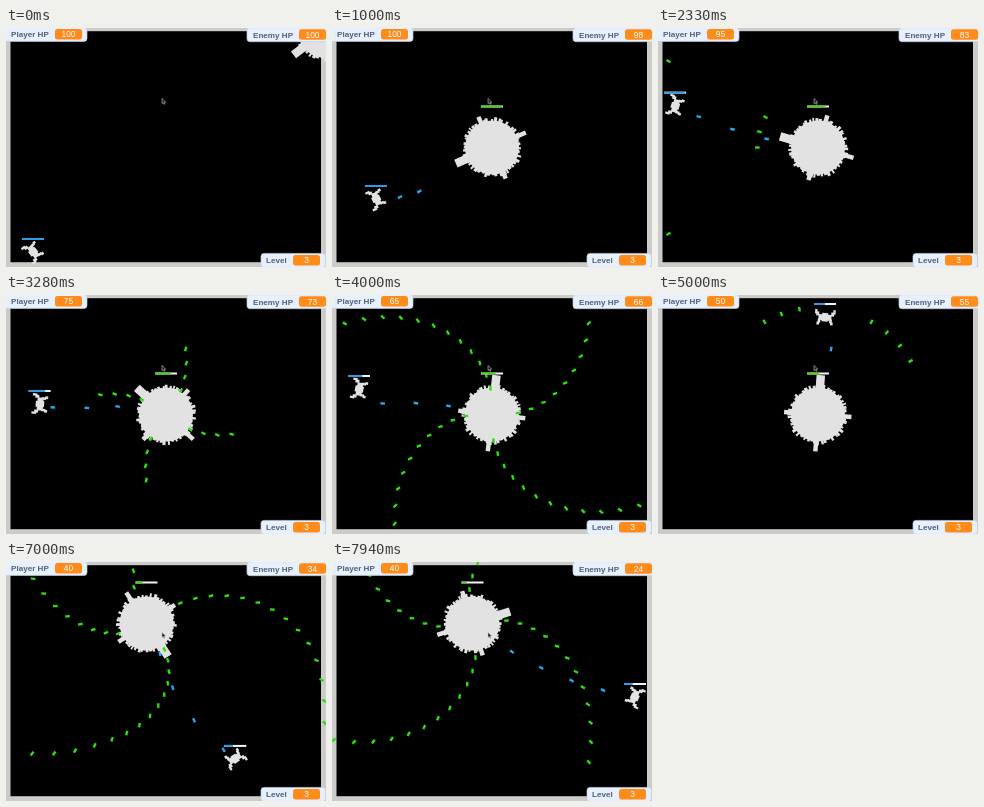
An HTML page with a canvas that plays this animation: 320x239 px, repeating every 8 s.

```html
<!DOCTYPE html>
<html lang="en">
<head>
<meta charset="utf-8">
<title>Boss fight</title>
<style>
  html, body { margin: 0; width: 100%; height: 100%; overflow: hidden; background: #000; }
  canvas { display: block; width: 100%; height: 100%; }
</style>
</head>
<body>
<canvas id="stage"></canvas>
<script>
const W = 320, H = 239, LOOP = 8000, FPS = 18, RAD = Math.PI / 180;
const ENEMY_R = 27, HIT_R = 20, MUZZLE_MS = 125;
const FIRST_SHOT = 793, SHOT_GAP = 98;
const BLUE = '#1fa9f5', GREEN = '#2be00d', PALE = '#e2e2e2';

const canvas = document.getElementById('stage');
const ctx = canvas.getContext('2d');
const ratio = Math.max(1, window.devicePixelRatio || 1);
canvas.width = W * ratio;
canvas.height = H * ratio;

// Key points: [time, x, y].
const playerPath = [
  [0, 27, 224], [750, 22, 208], [1000, 44, 171], [1400, 16, 140], [2330, 17, 78],
  [2600, 20, 50], [3200, 36, 115], [3600, 24, 84], [3930, 26, 106], [4000, 27, 94],
  [4500, 110, 26], [4890, 182, 23], [5000, 167, 22], [5500, 60, 65], [5800, 28, 118],
  [6110, 84, 158], [6650, 170, 205], [7300, 280, 190], [7700, 297, 157], [7940, 303, 135]
];
const enemyPath = [
  [0, 319, 3], [850, 160, 119.5], [5020, 160, 119.5], [5940, 157, 30], [6200, 157, 30], [6950, 140.5, 61.5]
];
const playerHpPath = [[0, 100], [2000, 100], [3900, 65], [5000, 50], [7200, 40]];

const playerHp = t => 5 * Math.round(along(playerHpPath, t)[0] / 5);
const enemyHp = t => Math.min(100, Math.round(97.6 - (t - 1000) * 0.01066));

const spirals = [
  { start: 2935, count: 17, angle: 196.7, turn: 5 },
  { start: 5960, count: 14, angle: 129, turn: -5 },
  { start: 7040, count: 16, angle: 50, turn: -5 }
];
const SPIRAL_STEP = 66.7;
const fans = [
  { start: 1470, first: 150, gap: 10, count: 10 },
  { start: 2030, first: 180, gap: 15, count: 3 },
  { start: 4465, first: 240, gap: 10, count: 10 }
];

function along(path, t) {
  const i = path.findIndex(row => row[0] > t);
  if (i < 0) return path[path.length - 1].slice(1);
  const a = path[i - 1], b = path[i], k = (t - a[0]) / (b[0] - a[0]);
  return a.slice(1).map((v, n) => v + (b[n + 1] - v) * k);
}
const playerAt = t => along(playerPath, t);
const enemyAt = t => along(enemyPath, t);
const distance = (a, b) => Math.hypot(a[0] - b[0], a[1] - b[1]);
const aim = (a, b) => Math.atan2(b[1] - a[1], b[0] - a[0]);

function gunAngle(t) {
  const s = spirals.find(s => t >= s.start && t < s.start + s.count * SPIRAL_STEP);
  return s ? (s.angle + s.turn * (t - s.start) / SPIRAL_STEP) * RAD : aim(enemyAt(t), playerAt(t));
}

function bulletAt(b, t) {
  const d = (t - b.start) * b.speed;
  return [b.from[0] + Math.cos(b.angle) * d, b.from[1] + Math.sin(b.angle) * d];
}

// A bullet lives until it first comes within reach of its target.
function shoot(b, target, radius) {
  b.end = b.start + 2200;
  for (let t = b.start; t < b.end; t += 10) {
    if (distance(bulletAt(b, t), target(t)) < radius) b.end = t;
  }
  return b;
}
const enemyShot = (start, degrees) =>
  shoot({ start, from: enemyAt(start), angle: degrees * RAD, speed: 0.2 }, playerAt, HIT_R);
function playerShot(start) {
  const from = playerAt(start);
  return shoot({ start, from, angle: aim(from, enemyAt(start)), speed: 0.35 }, enemyAt, ENEMY_R);
}

const enemyShots = [], playerShots = [];
for (const s of spirals)
  for (let i = 0; i < s.count; i++)
    for (let arm = 0; arm < 4; arm++)
      enemyShots.push(enemyShot(s.start + i * SPIRAL_STEP, s.angle + i * s.turn + arm * 90));
for (const f of fans)
  for (let i = 0; i < f.count; i++) enemyShots.push(enemyShot(f.start, f.first + i * f.gap));
for (let t = FIRST_SHOT; t < LOOP; t += SHOT_GAP) playerShots.push(playerShot(t));

let seed = 11;
const random = () => (seed = seed * 16807 % 2147483647) / 2147483647;
const teeth = Array.from({ length: 46 }, (_, i) => ({
  angle: (i + random() * 0.6) / 46 * Math.PI * 2,
  reach: ENEMY_R + 0.5 + random() * 3.2,
  width: 1.8 + random() * 1.6
}));

function rect(x, y, w, h, color) {
  ctx.fillStyle = color;
  ctx.fillRect(x, y, w, h);
}

function placed([x, y], angle, draw) {
  ctx.save();
  ctx.translate(x, y);
  ctx.rotate(angle);
  draw();
  ctx.restore();
}

function drawShots(shots, t, delay, color) {
  for (const b of shots) {
    if (t < b.start + delay || t >= b.end) continue;
    placed(bulletAt(b, t), b.angle, () => rect(-2.3, -1.2, 4.6, 2.4, color));
  }
}

function spike(angle, reach, width) {
  placed([0, 0], angle, () => rect(20, -width / 2, reach - 20, width, PALE));
}

function drawEnemy(pos, angle) {
  placed(pos, angle, () => {
    ctx.fillStyle = PALE;
    ctx.beginPath();
    ctx.arc(0, 0, ENEMY_R, 0, Math.PI * 2);
    ctx.fill();
    teeth.forEach(s => spike(s.angle, s.reach, s.width));
    spike(0, 39.5, 8.5);
    spike(Math.PI / 2, 33.5, 4.5);
    spike(Math.PI, 37, 4.5);
    spike(-Math.PI / 2, 34, 4.5);
  });
}

function drawPlayer(pos, angle) {
  placed(pos, angle, () => {
    rect(-2.5, -6.5, 6, 13, PALE);
    rect(-4, -3, 8.5, 6, PALE);
    for (const side of [-1, 1]) {
      ctx.save();
      ctx.scale(1, side);
      rect(-5, 6, 4, 3, PALE);
      rect(-7.5, 8, 4.5, 2.3, PALE);
      rect(2, 4.5, 4, 2.6, PALE);
      rect(5, 5.5, 3, 2.6, PALE);
      ctx.restore();
    }
  });
}

function drawBar([x, y], part, color) {
  rect(x - 11, y - 1, 22, 2, '#f4f4f4');
  rect(x - 11, y - 1, 22 * part, 2, color);
}

function box(x, y, w, h, r, fill, stroke) {
  ctx.beginPath();
  ctx.roundRect(x, y, w, h, r);
  ctx.fillStyle = fill;
  ctx.fill();
  if (!stroke) return;
  ctx.strokeStyle = stroke;
  ctx.lineWidth = 0.7;
  ctx.stroke();
}

function monitor(x, y, w, label, labelX, valueX, value) {
  box(x, y, w, 14, 3, '#e6f0ff', '#c4ccd8');
  box(valueX, y + 1.6, 27, 10.4, 2.5, '#ff8c1a');
  ctx.textBaseline = 'alphabetic';
  ctx.textAlign = 'left';
  ctx.font = 'bold 8.1px "Liberation Sans", Arial, sans-serif';
  ctx.fillStyle = '#575e75';
  ctx.fillText(label, labelX, y + 9.8);
  ctx.textAlign = 'center';
  ctx.font = '8.4px "Liberation Sans", Arial, sans-serif';
  ctx.fillStyle = '#fff';
  ctx.fillText(value, valueX + 13.5, y + 9.8);
}

function drawCursor(x, y) {
  ctx.beginPath();
  [[0, 0], [0, 5], [1.2, 4], [2.1, 5.8], [3, 5.4], [2.2, 3.6], [3.7, 3.6]]
    .forEach(([dx, dy]) => ctx.lineTo(x + dx, y + dy));
  ctx.closePath();
  ctx.fillStyle = '#111';
  ctx.fill();
  ctx.strokeStyle = '#c8c8c8';
  ctx.lineWidth = 0.6;
  ctx.stroke();
}

function draw(t) {
  const player = playerAt(t), enemy = enemyAt(t);

  ctx.setTransform(ratio, 0, 0, ratio, 0, 0);
  rect(0, 0, W, H, '#cbccca');
  rect(4.5, 3.2, 310.5, 231, '#000');

  drawShots(playerShots, t, 0, BLUE);
  drawPlayer(player, aim(player, enemy));
  drawEnemy(enemy, gunAngle(t));
  drawShots(enemyShots, t, MUZZLE_MS, GREEN);
  drawBar([player[0], player[1] - 13], playerHp(t) / 100, '#2f9be6');
  drawBar([enemy[0], enemy[1] - 41], enemyHp(t) / 100, '#45d61c');

  monitor(-2, -0.6, 83, 'Player HP', 5, 49, playerHp(t));
  monitor(241, -0.3, 84, 'Enemy HP', 247, 293, enemyHp(t));
  monitor(255, 225.4, 64.5, 'Level', 260, 287, 3);
  drawCursor(156, 70.5);
}

const origin = performance.now();
function tick() {
  const t = (performance.now() - origin) % LOOP;
  draw(Math.floor((t + 10) * FPS / 1000) * 1000 / FPS);
  requestAnimationFrame(tick);
}
tick();
</script>
</body>
</html>
```
